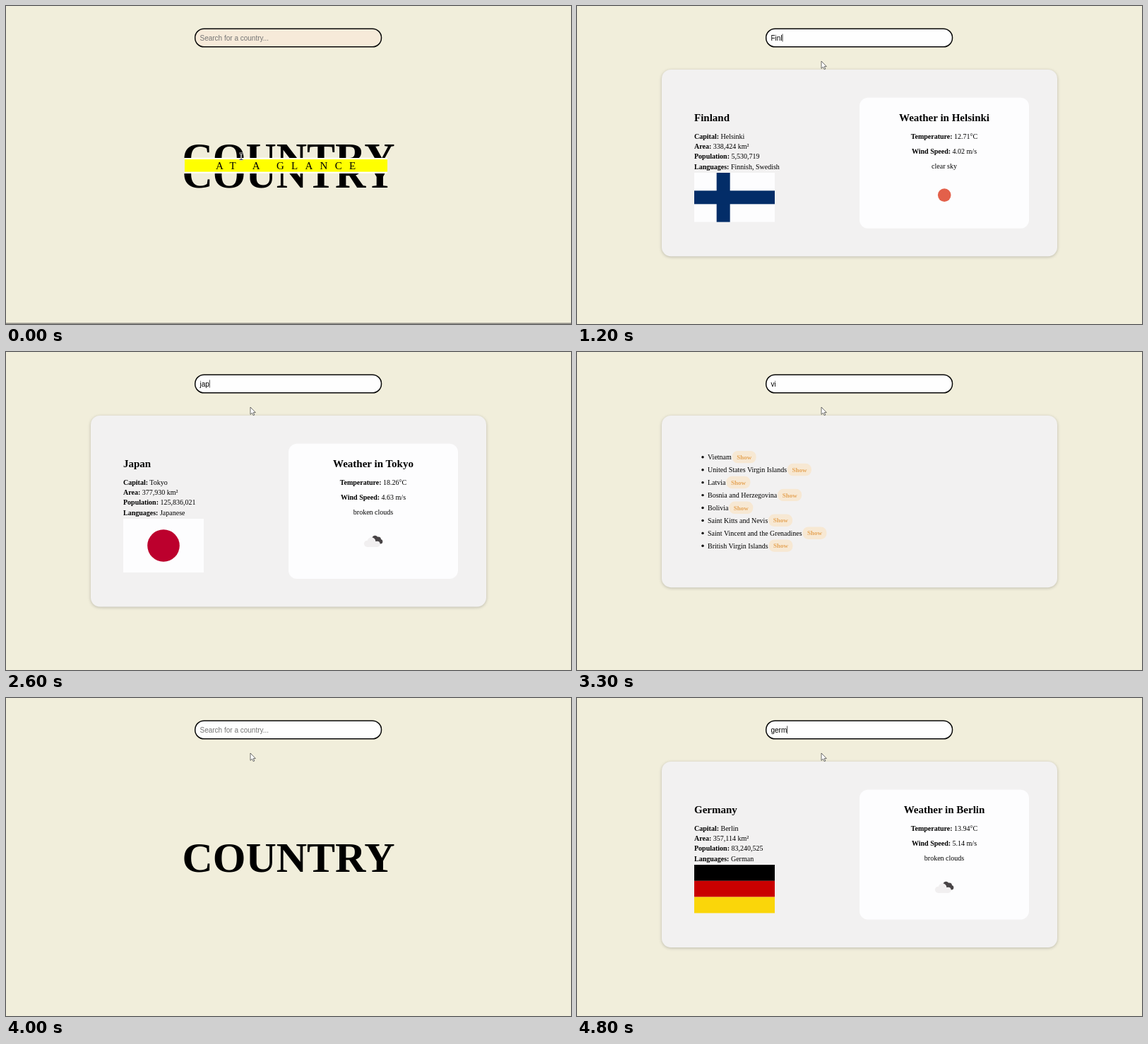
An HTML page that plays this animation: 800x450 px, repeating every 5000 ms.

```html
<!DOCTYPE html>
<html lang="en">
<head>
<meta charset="utf-8">
<title>Country at a glance</title>
<style>
  html, body { margin: 0; width: 100%; height: 100%; overflow: hidden; background: #f1eedb; }
  svg { display: block; width: 800px; height: 450px; }
  text { font: 10px "Liberation Serif", "Times New Roman", serif; white-space: pre; }
  .b { font-weight: bold; }
  .h { font-size: 15px; font-weight: bold; }
  .mid { text-anchor: middle; }
  .word { font-size: 60px; font-weight: bold; text-anchor: middle; }
  .sub { font-size: 15px; letter-spacing: 10.25px; }
  .show { font-size: 9px; font-weight: bold; fill: #e5a65a; }
  #query { font-family: "Liberation Sans", Arial, sans-serif; }
  .card > rect:first-child { filter: drop-shadow(0 1.5px 2px rgba(0, 0, 0, .22)); }
</style>
</head>
<body>
<svg id="stage" viewBox="0 0 800 450">
  <defs>
    <clipPath id="upper"><rect x="240" y="190" width="320" height="36"/></clipPath>
    <clipPath id="lower"><rect x="240" y="226" width="320" height="36"/></clipPath>
  </defs>
  <rect width="800" height="450" fill="#f1eedb"/>
  <rect id="edge" y="448.6" width="800" height="1" fill="#555"/>
  <rect id="field" x="267.7" y="32.2" width="263.8" height="25.6" rx="12.6" stroke="#080808" stroke-width="1.5"/>
  <text id="query" x="274.5" y="48.5"></text>
  <rect id="caret" y="39.5" width=".8" height="11" fill="#222"/>
  <g id="logo">
    <g id="band">
      <rect x="253" y="214.7" width="287" height="22" fill="#fff"/>
      <rect x="253" y="217" width="287" height="17.6" fill="#ff0"/>
      <text class="sub" x="297" y="231">AT A GLANCE</text>
    </g>
    <g id="top"><text class="word" x="400" y="246" clip-path="url(#upper)">COUNTRY</text></g>
    <g id="bottom"><text class="word" x="400" y="246" clip-path="url(#lower)">COUNTRY</text></g>
  </g>
  <g id="cards"></g>
  <g id="arrow"><path d="M0 0V10.4L2.5 8.2L4.2 11.7L5.8 11L4.2 7.6H7.3Z" fill="#fff" stroke="#333" stroke-width=".7"/></g>
  <g id="beam" fill="none">
    <path d="M-2.5-4.5H2.5M0-4.5V4.5M-2.5 4.5H2.5" stroke="#fff" stroke-width="2.2"/>
    <path d="M-2.5-4.5H2.5M0-4.5V4.5M-2.5 4.5H2.5" stroke="#222" stroke-width=".9"/>
  </g>
</svg>
<script>
const LOOP = 5000, STEP = 100;
const $ = id => document.getElementById(id);

function add(parent, tag, attrs, content) {
  const el = document.createElementNS('http://www.w3.org/2000/svg', tag);
  for (const k in attrs) el.setAttribute(k, attrs[k]);
  if (content) el.textContent = content;
  parent.appendChild(el);
  return el;
}
const rect = (g, x, y, width, height, fill, rx = 0) => add(g, 'rect', { x, y, width, height, fill, rx });
const disc = (g, cx, cy, r, fill) => add(g, 'circle', { cx, cy, r, fill });
const text = (g, x, y, str, cls = '') => add(g, 'text', { x, y, class: cls }, str);

function fact(g, x, y, label, value, cls) {
  const el = text(g, x, y, '', cls);
  add(el, 'tspan', { class: 'b' }, label + ':');
  add(el, 'tspan', {}, ' ' + value);
}

function card(height) {
  const g = add($('cards'), 'g', { class: 'card' });
  rect(g, 120, 90, 560, height, '#f2f1f1', 13);
  return g;
}

// Flags are drawn with their top left corner at 166, 236 and 114 wide.
const flags = {
  Finland(g, h) {
    const u = 114 / 18;
    rect(g, 166, 236, 114, h, '#fdfdfe');
    rect(g, 166 + 5 * u, 236, 3 * u, h, '#032d68');
    rect(g, 166, 236 + 4 * u, 114, 3 * u, '#032d68');
  },
  Germany(g, h) {
    ['#000', '#c90000', '#fad60a'].forEach((c, i) => rect(g, 166, 236 + i * h / 3, 114, h / 3, c));
  },
  Japan(g, h) {
    rect(g, 166, 236, 114, h, '#fdfdfe');
    disc(g, 223, 236 + h / 2, h * .3, '#bc002d');
  },
  Vietnam(g, h) {
    rect(g, 166, 236, 114, h, '#da251d');
    const pts = Array.from({ length: 10 }, (_, i) => {
      const r = h * (i % 2 ? .115 : .3), a = i * Math.PI / 5;
      return [223 + r * Math.sin(a), 236 + h / 2 - r * Math.cos(a)];
    });
    add(g, 'polygon', { points: pts.join(' '), fill: '#ff0' });
  }
};

function sun(g) { disc(g, 520.2, 267.6, 9.3, '#e3604a'); }

function clouds(g) {
  const dark = '#484446', pale = '#f1eff0';
  disc(g, 522.5, 264, 4.2, dark);
  disc(g, 527, 265.5, 4, dark);
  disc(g, 530, 268.3, 3.3, dark);
  disc(g, 517.5, 268, 5.8, pale);
  disc(g, 511.5, 271.3, 4.6, pale);
  disc(g, 525.5, 271.8, 4.1, pale);
  rect(g, 511, 268, 15, 7.9, pale);
}

function country(name, ratio, [capital, area, people, tongue], [temp, wind, sky, icon]) {
  const h = 114 * ratio, g = card(194.6 + h);
  text(g, 166, 163, name, 'h');
  fact(g, 166, 187.6, 'Capital', capital);
  fact(g, 166, 201.9, 'Area', area + ' km²');
  fact(g, 166, 216.2, 'Population', people);
  fact(g, 166, 230.5, 'Languages', tongue);
  flags[name](g, h);
  rect(g, 400, 129.7, 240, 115.4 + h, '#fdfdfe', 12);
  text(g, 520, 163, 'Weather in ' + capital, 'h mid');
  fact(g, 520, 187.6, 'Temperature', temp + '°C', 'mid');
  fact(g, 520, 209, 'Wind Speed', wind + ' m/s', 'mid');
  text(g, 520, 230.3, sky, 'mid');
  icon(g);
  return g;
}

function list(names) {
  const g = card(99.7 + 17.93 * names.length);
  names.forEach((name, i) => {
    const y = 148.6 + 17.93 * i;
    disc(g, 178, y + .2, 1.7, '#000');
    const end = 185 + text(g, 185, y + 3.4, name).getComputedTextLength();
    rect(g, end + .8, y - 8.7, 34, 17.4, '#f7e8d3', 8);
    text(g, end + 7.4, y + 3.2, 'Show', 'show');
  });
  return g;
}

const finland = country('Finland', 11 / 18, ['Helsinki', '338,424', '5,530,719', 'Finnish, Swedish'], ['12.71', '4.02', 'clear sky', sun]);
const germany = country('Germany', 3 / 5, ['Berlin', '357,114', '83,240,525', 'German'], ['13.94', '5.14', 'broken clouds', clouds]);
const japan = country('Japan', 2 / 3, ['Tokyo', '377,930', '125,836,021', 'Japanese'], ['18.26', '4.63', 'broken clouds', clouds]);
const vietnam = country('Vietnam', 2 / 3, ['Hanoi', '331,212', '97,338,583', 'Vietnamese'], ['25.00', '2.35', 'broken clouds', clouds]);

const results = {
  Fi: list(['Finland', 'Fiji']), Fin: finland, Finl: finland,
  ja: list(['Japan', 'Jamaica', 'Azerbaijan', 'Tajikistan', 'Svalbard and Jan Mayen']), jap: japan,
  vi: list(['Vietnam', 'United States Virgin Islands', 'Latvia', 'Bosnia and Herzegovina', 'Bolivia',
    'Saint Kitts and Nevis', 'Saint Vincent and the Grenadines', 'British Virgin Islands']), vie: vietnam,
  ge: list(['Germany', 'Georgia', 'Algeria', 'Argentina', 'Niger', 'Nigeria', 'South Georgia']),
  ger: list(['Germany', 'Algeria', 'Niger', 'Nigeria']), germ: germany
};

const typing = [
  [0, ''], [700, 'F'], [900, 'Fi'], [1000, 'Fin'], [1200, 'Finl'],
  [1900, 'Fin'], [2000, 'Fi'], [2100, 'F'], [2200, ''],
  [2300, 'j'], [2400, 'ja'], [2500, 'jap'], [3100, ''],
  [3200, 'v'], [3300, 'vi'], [3400, 'vie'], [3800, 'vi'], [3900, 'v'], [4000, ''],
  [4100, 'g'], [4200, 'ge'], [4300, 'ger'], [4400, 'germ']
];
const pointer = [[0, 333, 213], [100, 333, 180], [200, 335, 110], [300, 338, 48], [400, 338, 48], [500, 343, 66], [600, 346, 78]];

const at = (table, t) => table.filter(row => row[0] <= t).pop();
const show = (el, on) => el.setAttribute('visibility', on ? 'visible' : 'hidden');
const move = (el, x, y) => el.setAttribute('transform', `translate(${x} ${y})`);

function draw(t) {
  const query = at(typing, t)[1], hit = results[query], focused = t >= 400;
  show($('edge'), t < 100);
  $('field').setAttribute('fill', focused ? '#fefefe' : '#f6ead9');
  $('query').textContent = query || 'Search for a country...';
  $('query').setAttribute('fill', query ? '#000' : '#757575');
  $('caret').setAttribute('x', 274.5 + (query ? $('query').getComputedTextLength() : 0));
  show($('caret'), focused && (t + 100) % 1200 < 400);

  const p = Math.min(1, Math.max(0, (t - 100) / 400));
  const open = 1 - p * p * (3 - 2 * p);
  $('logo').style.display = hit ? 'none' : '';
  move($('top'), 0, -11 * open);
  move($('bottom'), 0, 11 * open);
  $('band').setAttribute('transform', `translate(0 226) scale(1 ${open}) translate(0 -226)`);
  show($('band'), open > 0);
  for (const g of $('cards').children) g.style.display = g === hit ? '' : 'none';

  const [, x, y] = at(pointer, t);
  const overText = t < 200 || (t >= 300 && t < 500);
  show($('beam'), overText);
  show($('arrow'), !overText);
  move($('beam'), x, y);
  move($('arrow'), x, y);
}

const start = performance.now();
let last = -1;
function tick() {
  const t = Math.floor(((performance.now() - start) % LOOP) / STEP) * STEP;
  if (t !== last) draw(last = t);
  requestAnimationFrame(tick);
}
tick();
</script>
</body>
</html>
```
